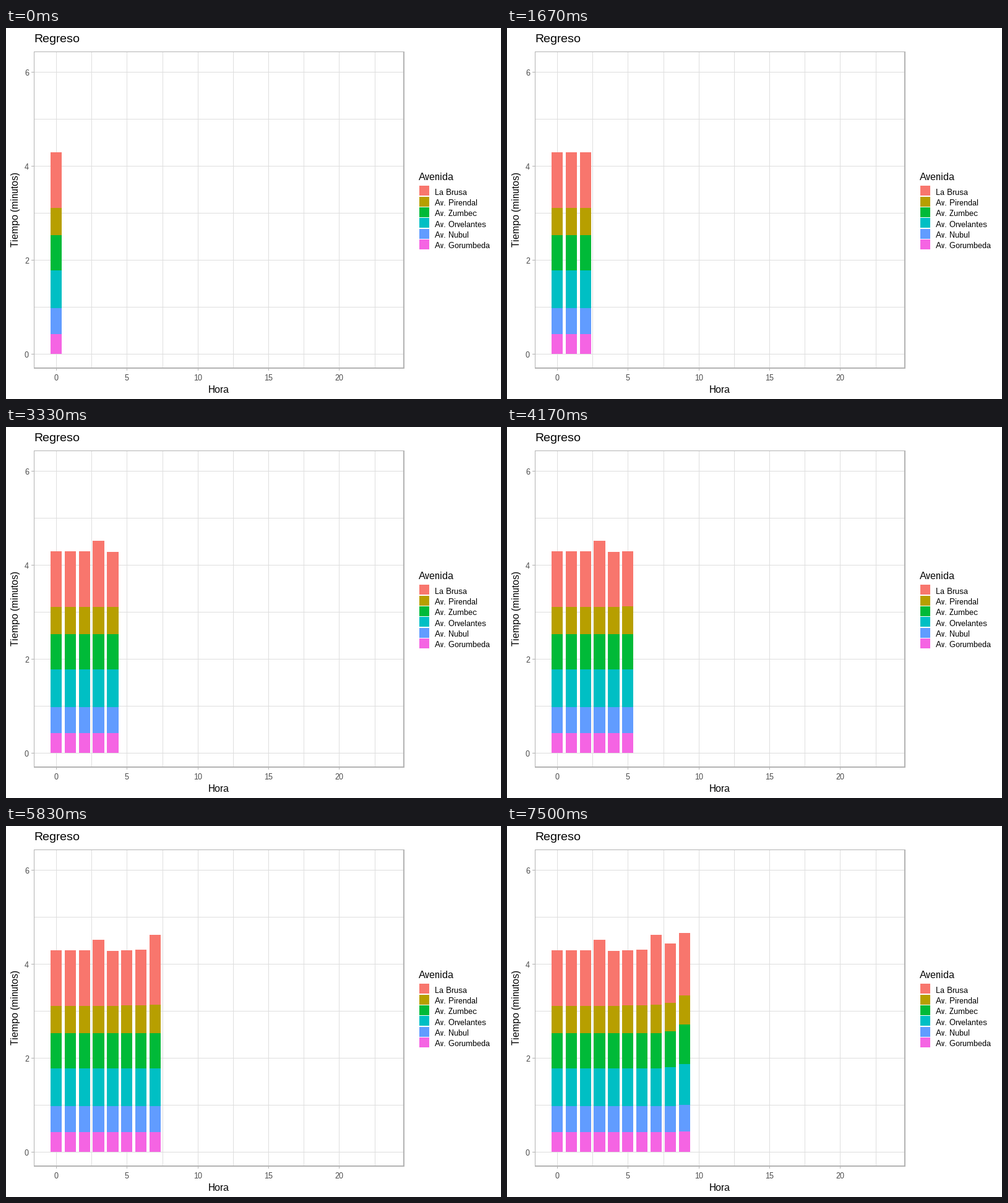
A matplotlib script that plays this animation: 800 px wide and 600 px high, repeating every 8000 ms.

```python
import matplotlib.pyplot as plt
from matplotlib.animation import FuncAnimation
from matplotlib.collections import PolyCollection

W, H, DPI = 800, 600, 100
STEP = 20          # ms per frame
LOOP = 8000        # ms per loop
BARS_PER_MS = 1.2 / 1000

AVENUES = [
    ("La Brusa", "#F8766D"),
    ("Av. Pirendal", "#B79F00"),
    ("Av. Zumbec", "#00BA38"),
    ("Av. Orvelantes", "#00BFC4"),
    ("Av. Nubul", "#619CFF"),
    ("Av. Gorumbeda", "#F564E3"),
]

# Upper edge of each segment in pixels, in legend order
BASE = 527
CALM = [335, 392, 453, 495]
TOPS = [
    [201, 291] + CALM,
    [201, 291] + CALM,
    [201, 291] + CALM,
    [184, 291] + CALM,
    [202, 291] + CALM,
    [201, 290] + CALM,
    [200, 290] + CALM,
    [176, 289] + CALM,
    [190, 286, 332, 390, 453, 495],
    [173, 274, 321, 385, 451, 494],
]

GRID, EDGE, TICK_TEXT = "#DEDEDE", "#B3B3B3", "#4D4D4D"
LEFT, TOP, RIGHT, BOTTOM = 45, 38, 643, 550
GRID_X = [81, 138, 195, 253, 310, 367, 424, 481, 538, 596]
GRID_Y = range(71, 528, 76)

plt.rcParams["font.family"] = "Liberation Sans"
plt.rcParams["text.hinting"] = "native"
plt.rcParams["text.hinting_factor"] = 1

fig = plt.figure(figsize=(W / DPI, H / DPI), dpi=DPI, facecolor="white")
ax = fig.add_axes([0, 0, 1, 1])
ax.set_xlim(0, W)
ax.set_ylim(H, 0)
ax.axis("off")


def boxes(rects, colors, z):
    """Filled rectangles given as (x0, y0, x1, y1) in pixels."""
    verts = [[(x0, y0), (x1, y0), (x1, y1), (x0, y1)]
             for x0, y0, x1, y1 in rects]
    group = PolyCollection(verts, facecolors=colors, edgecolors="none",
                           linewidths=0, zorder=z)
    return ax.add_collection(group, autolim=False)


def label(x, y, text, px, color="black", ha="left", **kw):
    ax.text(x, y, text, fontsize=px * 72 / DPI, color=color, ha=ha,
            va="baseline", **kw)


def draw_panel():
    boxes([(x, TOP, x + 1, BOTTOM) for x in GRID_X]
          + [(LEFT, y, RIGHT, y + 1) for y in GRID_Y], GRID, 1)
    frame = [(LEFT, TOP, LEFT + 1, BOTTOM + 1),
             (LEFT, TOP, RIGHT + 1, TOP + 1),
             (RIGHT - 1, TOP, RIGHT + 1, BOTTOM + 1),
             (LEFT, BOTTOM - 1, RIGHT + 1, BOTTOM + 1)]
    ticks = [(x, BOTTOM, x + 1, BOTTOM + 4) for x in GRID_X[::2]]
    ticks += [(LEFT - 4, y, LEFT, y + 1) for y in GRID_Y[::2]]
    boxes(frame + ticks, EDGE, 3)

    for i, x in enumerate(GRID_X[::2]):
        label(x, 570, str(5 * i), 13, TICK_TEXT, "center")
    for i, y in enumerate(GRID_Y[::2]):
        label(37, y + 6, str(6 - 2 * i), 13, TICK_TEXT, "right")
    label(45, 23, "Regreso", 19.5)
    label(343.5, 590, "Hora", 16, ha="center")
    label(20, 293.5, "Tiempo (minutos)", 16, ha="center",
          rotation=90, rotation_mode="anchor")


def draw_legend():
    label(667, 246, "Avenida", 16)
    keys = []
    for i, (name, _) in enumerate(AVENUES):
        y = round(255.4 + 17.28 * i)
        keys.append((668, y, 684, y + 16))
        label(693, round(269.9 + 17.28 * i), name, 13)
    boxes(keys, [c for _, c in AVENUES], 2)


def draw_bar(hour):
    x = 72.25 + 22.875 * hour
    tops = TOPS[hour]
    rects = [(int(x), y0, int(x + 18.3), y1)
             for y0, y1 in zip(tops, tops[1:] + [BASE])]
    return boxes(rects, [c for _, c in AVENUES], 2)


draw_panel()
draw_legend()
bars = [draw_bar(hour) for hour in range(len(TOPS))]


def update(n):
    # Small lead so each bar appears on the nearest frame
    shown = 1 + int((n + 0.7) * STEP * BARS_PER_MS)
    for hour, bar in enumerate(bars):
        bar.set_visible(hour < shown)
    return bars


anim = FuncAnimation(fig, update, frames=LOOP // STEP, interval=STEP,
                     init_func=lambda: update(0), repeat=True, repeat_delay=0)
plt.show()
```
